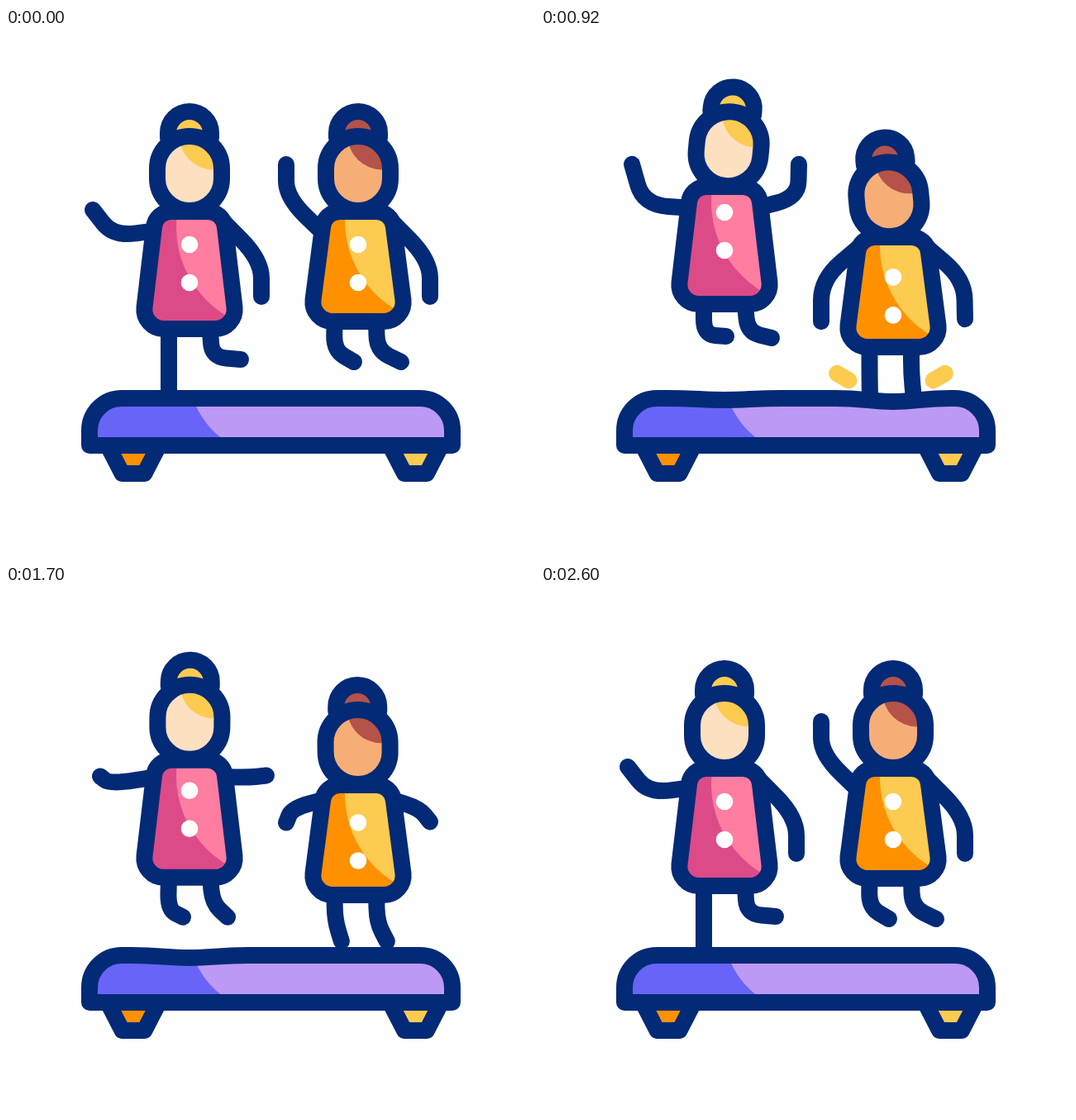
An HTML page with a canvas that plays this animation: 640x640 px, repeating every 2.8 s.

```html
<!DOCTYPE html>
<html lang="en">
<head>
<meta charset="utf-8">
<title>Trampoline</title>
<style>
html, body { margin: 0; width: 100%; height: 100%; overflow: hidden; background: #fff; }
canvas { display: block; width: 640px; height: 640px; }
</style>
</head>
<body>
<canvas id="stage" width="640" height="640"></canvas>
<script>
const ctx = document.getElementById('stage').getContext('2d');
const NAVY = '#032a76', GOLD = '#fdcb50', ORANGE = '#ff9100';
const LOOP = 2800, CYCLE = 940;

// Pose rows: body y, mat sag, left arm, right arm, left leg, right leg.
// A limb is its bend x, y and its end x, y; x counts from the body axis.
// Arms move with the body, legs are placed on the stage.
const girls = [
  {
    x: 222, hem: 364, hips: [-25, 25], shade: 241, marks: [222.7, 0], landings: [445, 1345, 2285],
    buttonLag: y => y * (y < 0 ? 1.3 : 0.92),
    skin: '#fce0c0', hair: GOLD, dress: ['#dc4b87', '#ff7da0'],
    poses: {
      rest: [0, 0, -92, 252, -117, 220, 87, 281, 87, 325, -25, 410, -25, 448, 27, 398, 62, 401],
      land: [15, 0, -83, 247, -103, 304, 76, 247, 96, 302, -25, 415, -20, 445, 26, 412, 36, 445],
      sink: [25, 5.5, -84, 248, -101, 326, 75, 243, 97, 324, -25, 415, -25, 448, 26, 415, 27, 448],
      push: [-10, 3, -96, 251, -108, 242, 71, 243, 93, 241, -26, 393, -8, 402, 28, 385, 46, 402],
      rise: [-30, 2, -98, 244, -112, 195, 89, 235, 90, 195, -25, 371, 2, 373, 28, 368, 57, 375],
      peak: [-34, 0, -97, 242, -113, 186, 89, 232, 89, 187, -26, 366, 4, 368, 30, 365, 62, 367]
    }
  },
  {
    x: 426, hem: 355, hips: [-28.5, 22], shade: 233, marks: [423.5, 2], landings: [60, 870, 1810],
    buttonLag: y => y * 1.27,
    skin: '#f6ae76', hair: '#b55249', dress: [ORANGE, GOLD],
    poses: {
      rest: [0, 0, -87, 205, -87, 165, 87, 281, 87, 325, -29, 390, -5, 404, 23, 390, 52, 404],
      land: [6, 3, -87, 226, -87, 194, 87, 229, 87, 196, -29, 394, -8, 412, 22, 395, 47, 412],
      sink: [0.5, 1.5, -87, 207, -87, 168, 86, 224, 87, 170, -29, 390, -5, 405, 23, 390, 51, 405],
      push: [20, 0, -80, 250, -87, 267, 74, 250, 87, 266, -28, 405, -20, 431, 23, 408, 35, 431],
      rise: [31, 4, -87, 273, -87, 324, 86, 273, 87, 321, -28.5, 418, -28, 448, 22, 418, 25, 448],
      peak: [33, 5.5, -87, 275, -87, 334, 87, 275, 87, 331, -28.5, 420, -28.5, 448, 22, 420, 22, 448]
    }
  }
];
const tilts = { rest: 0, land: -5.4, sink: -7.2, push: 0.4, rise: 5.4, peak: 7.1 };

// Pose names are those of the left girl; the right one is half a bounce away.
const bounce = [[560, 'sink'], [760, 'push'], [920, 'rise'], [1040, 'peak'], [1100, 'peak'], [1360, 'land']];
const keys = [
  [0, 'rest'], [200, 'peak'], [230, 'peak'], [430, 'land'],
  ...bounce,
  ...bounce.map(([t, name]) => [t + CYCLE, name]),
  [560 + 2 * CYCLE, 'sink'], [2600, 'rest']
];

// Smooth interpolation through the keys that never overshoots.
function track(valueOf) {
  const v = keys.map(k => valueOf(k[1]));
  const grade = i => (v[i + 1] - v[i]) / (keys[i + 1][0] - keys[i][0]);
  const slope = i => {
    if (i === 0 || i === v.length - 1) return 0;
    const a = grade(i - 1), b = grade(i);
    return a * b <= 0 ? 0 : 2 * a * b / (a + b);
  };
  return t => {
    let i = 0;
    while (i < keys.length - 2 && t >= keys[i + 1][0]) i++;
    const d = keys[i + 1][0] - keys[i][0];
    const u = Math.min(1, (t - keys[i][0]) / d), w = 1 - u;
    return v[i] * (1 + 2 * u) * w * w + v[i + 1] * u * u * (3 - 2 * u)
      + d * u * w * (w * slope(i) - u * slope(i + 1));
  };
}

for (const g of girls) {
  g.tracks = g.poses.rest.map((_, i) => track(name => g.poses[name][i]));
  g.gown = gown(g.hem);
}
const tilt = track(name => tilts[name]);

function gown(hem) {
  const s = hem - 26;
  return new Path2D(`M-22 222H22C33 222 42 230 43 241L54.5 ${s}C56 ${s + 14} 45 ${hem} 31 ${hem}
    H-31C-45 ${hem} -56 ${s + 14} -54.5 ${s}L-43 241C-42 230 -33 222 -22 222Z`);
}
const bun = new Path2D('M-26 133V127A26 26 0 0 1 26 127V133');
const head = new Path2D('M-39 170A39 39 0 0 1 39 170V182A39 39 0 0 1 -39 182Z');

function disc(x, y, r, color) {
  ctx.fillStyle = color;
  ctx.beginPath();
  ctx.arc(x, y, r, 0, 7);
  ctx.fill();
}

function fill(path, color) {
  ctx.fillStyle = color;
  ctx.fill(path);
}

// Filled outline with a second tone painted inside it.
function panel(path, color, inside) {
  fill(path, color);
  ctx.save();
  ctx.clip(path);
  inside();
  ctx.restore();
  ctx.stroke(path);
}

function limb(x, y, bx, by, ex, ey) {
  ctx.beginPath();
  ctx.moveTo(x, y);
  ctx.lineTo((x + bx) / 2, (y + by) / 2);
  ctx.quadraticCurveTo(bx, by, (bx + ex) / 2, (by + ey) / 2);
  ctx.lineTo(ex, ey);
  ctx.stroke();
}

function drawLegs(g, p) {
  ctx.save();
  ctx.translate(g.x, 0);
  limb(g.hips[0], g.hem + p[0], ...p.slice(10, 14));
  limb(g.hips[1], g.hem + p[0], ...p.slice(14, 18));
  ctx.restore();
}

function drawBody(g, p, angle) {
  ctx.save();
  ctx.translate(g.x, p[0]);
  for (const [side, at] of [[-1, 2], [1, 6]]) {
    const arm = p.slice(at, at + 4);
    limb(side * 38, 242 - (arm[3] - 242) * 0.13, ...arm);
  }

  ctx.save();
  ctx.translate(0, 230);
  ctx.rotate(angle * Math.PI / 180);
  ctx.translate(0, -230);
  fill(bun, g.hair);
  ctx.stroke(bun);
  panel(head, g.skin, () => disc(29, 130, 41.5, g.hair));
  ctx.restore();

  panel(g.gown, g.dress[0], () => disc(109, g.shade, 125, g.dress[1]));
  const lag = g.buttonLag(p[0]) - p[0];
  for (const y of [262, 308]) disc(0, y + lag, 10.3, '#fff');
  ctx.restore();
}

function drawMarks(g, t) {
  const [x, drop] = g.marks;
  for (const start of g.landings) {
    const u = t - start;
    if (u <= 0 || u >= 195) continue;
    const outer = 54 + 18 * Math.min(1, u / 80);
    const inner = 51 + 21 * Math.max(0, (u - 115) / 80);
    const y = d => 412 + drop + (72 - d) * 0.59;
    ctx.lineWidth = 20 * Math.min(1, u / 15, (195 - u) / 15);
    ctx.strokeStyle = GOLD;
    for (const side of [-1, 1]) {
      ctx.beginPath();
      ctx.moveTo(x + side * inner, y(inner));
      ctx.lineTo(x + side * outer, y(outer));
      ctx.stroke();
    }
  }
  ctx.lineWidth = 20;
  ctx.strokeStyle = NAVY;
}

function drawTrampoline(sags) {
  for (const [x, color] of [[154, ORANGE], [495.5, GOLD]]) {
    const foot = new Path2D(`M${x - 31} 505L${x - 13.5} 539H${x + 13.5}L${x + 31} 505Z`);
    fill(foot, color);
    ctx.stroke(foot);
  }
  const dips = girls.map((g, i) =>
    `H${g.x - 70}c35 0 42 ${sags[i]} 70 ${sags[i]}s35 ${-sags[i]} 70 ${-sags[i]}`).join('');
  const bed = new Path2D(`M101 505V487A39 39 0 0 1 140 448${dips}H501A39 39 0 0 1 540 487V505Z`);
  panel(bed, '#bb99f4', () => fill(new Path2D('M95 440H223L226 448Q238 481 266 500V510H95Z'), '#6864f8'));
}

function draw(t) {
  ctx.clearRect(0, 0, 640, 640);
  ctx.lineWidth = 20;
  ctx.lineCap = ctx.lineJoin = 'round';
  ctx.strokeStyle = NAVY;
  const now = girls.map(g => g.tracks.map(f => f(t)));
  const angle = tilt(t);
  girls.forEach((g, i) => {
    drawMarks(g, t);
    drawLegs(g, now[i]);
  });
  drawTrampoline(now.map(p => p[1]));
  girls.forEach((g, i) => drawBody(g, now[i], i ? -angle : angle));
}

const start = performance.now();
function tick() {
  draw((performance.now() - start) % LOOP);
  requestAnimationFrame(tick);
}
tick();
</script>
</body>
</html>
```
